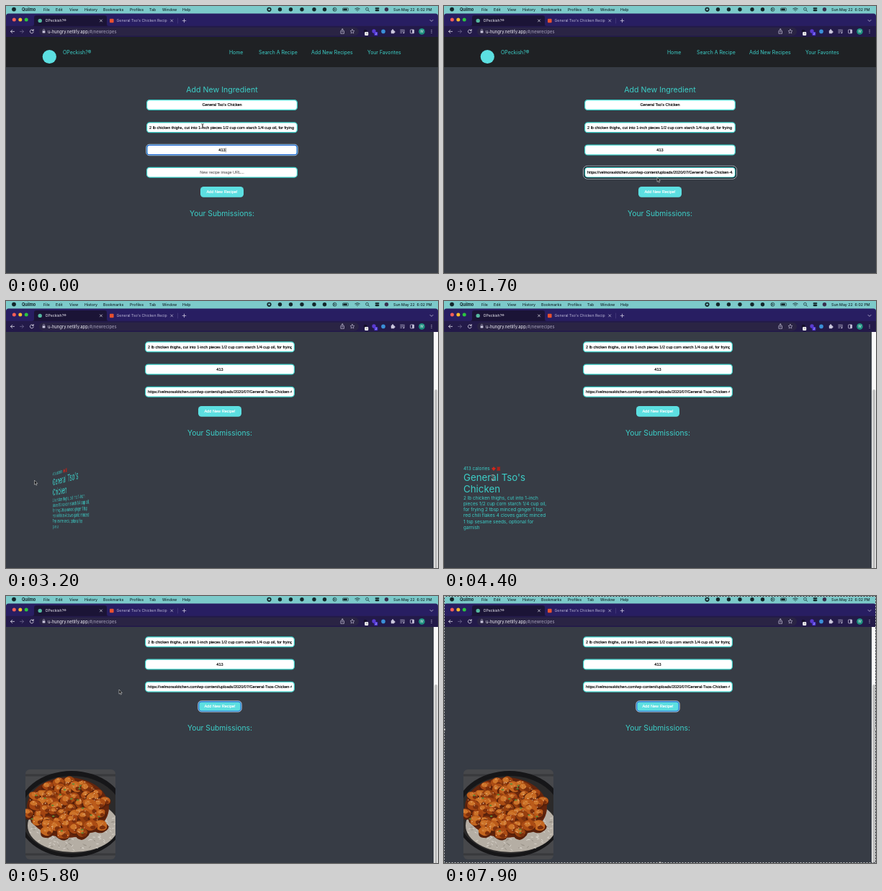
Recreate the animation shown at these times as an HTML page. Size 600x371 px, loop 8000 ms.

```html
<!DOCTYPE html>
<html lang="en">
<head>
<meta charset="utf-8">
<title>Recipe form</title>
<style>
  html, body { margin: 0; width: 100%; height: 100%; overflow: hidden; background: #373c45; }
  #stage { position: relative; width: 600px; height: 371px; overflow: hidden; }
  #stage > svg { position: absolute; left: 0; top: 0; }
  #view { position: absolute; left: 0; top: 43px; width: 600px; height: 328px; overflow: hidden; background: #373c45; }
  #view > svg { position: absolute; left: 0; top: 0; }
  #card { position: absolute; left: 26.5px; width: 125px; height: 125px; }
  #card svg { position: absolute; left: 0; top: 0; overflow: visible; }
  #front { border-radius: 6px; overflow: hidden !important; }
  text { white-space: pre; }
  .ui { font-family: Inter, sans-serif; }
  .form { font-family: "Liberation Sans", Arial, sans-serif; stroke: currentColor; stroke-width: .16px; }
</style>
</head>
<body>
<div id="stage">
  <div id="view">
    <svg id="page" width="600" height="328" viewBox="0 43 600 328"></svg>
    <div id="card">
      <svg id="front" width="125" height="125"></svg>
      <svg id="back" width="125" height="125"></svg>
    </div>
    <svg id="bar" width="600" height="328" viewBox="0 43 600 328">
      <rect x="594" y="43" width="6" height="328" fill="#fafafa"/>
      <rect id="thumb" x="595" y="43" width="4.2" height="249" rx="2.1" fill="#c1c1c1"/>
    </svg>
  </div>
  <svg id="top" width="600" height="371"></svg>
</div>
<script>
const LOOP = 8000, TEAL = '#3ccfc8', CYAN = '#5cdfe1';
const T = { focus: 550, paste: 1450, submit: 2050, scroll: 2800, flip: 2900, unflip: 4700, ring: 5500, select: 6150 };
const FLIP_MS = 800, SCROLL = 105, LENS = 417;
const $ = id => document.getElementById(id);

const label = (x, y, size, fill, str, extra = '', kind = 'ui') =>
  `<text class="${kind}" x="${x}" y="${y}" font-size="${size}" fill="${fill}" color="${fill}" ${extra}>${str}</text>`;
const rect = (x, y, w, h, r, fill, extra = '') =>
  `<rect x="${x}" y="${y}" width="${w}" height="${h}" rx="${r}" fill="${fill}" ${extra}/>`;
const dot = (x, y, r, fill, extra = '') => `<circle cx="${x}" cy="${y}" r="${r}" fill="${fill}" ${extra}/>`;
const line = (d, color, w = .8, extra = '') =>
  `<path d="${d}" fill="none" stroke="${color}" stroke-width="${w}" stroke-linecap="round" stroke-linejoin="round" ${extra}/>`;
const MID = 'text-anchor="middle"';

// ---------- page ----------
const DISH = 'General Tso\'s Chicken';
const PARTS = '2 lb chicken thighs, cut into 1-inch pieces 1/2 cup corn starch 1/4 cup oil, for frying 2 tbsp minced ginger';
const PHOTO = 'https://velmoraskitchen.com/wp-content/uploads/2020/07/General-Tsos-Chicken-4.jpg';
const HISTORY = ['"http://www.pngmart.com/files/3/Toy-Story-Woody-PNG-Photos.png"', 'asdf', 'mo',
  './images/aloe.jpg', './assets/ramen/nirvana.jpg', '23'];

// Two-tone focus outline; grow moves it outwards.
const outline = (x, y, w, h, r, grow, color, width) =>
  rect(x - grow, y - grow, w + 2 * grow, h + 2 * grow, r + grow, 'none', `stroke="${color}" stroke-width="${width}"`);
const ring = (x, y, w, h, r, color, grow = 0) =>
  outline(x, y, w, h, r, grow + .2, '#dfe9f2', .8) + outline(x, y, w, h, r, grow - .8, color, 1.2);

function field(cx, w, y, str, { left, color = '#000', focus, grow } = {}) {
  const x = cx - w / 2, inner = w - 8;
  return rect(x + .6, y + .6, w - 1.2, 13.8, 4, '#fff', `stroke="${TEAL}" stroke-width="1.2"`) +
    (focus ? ring(x, y, w, 15, 4, focus, grow) : '') +
    `<svg x="${x + 4}" y="${y}" width="${inner}" height="15">` +
    label(left ? 0 : inner / 2, 9.4, 5.56, color, str, left ? '' : MID, 'form') + '</svg>';
}

function page({ narrow, urlFocus, pasted, keyRing }) {
  const dx = narrow ? -3 : 0, cx = 300 + dx, w = narrow ? 208 : 210;
  const nav = [[310, 'Home'], [351, 'Search A Recipe'], [424, 'Add New Recipes'], [502, 'Your Favorites']];
  let s = rect(0, 43, 600, 42, 0, '#1f2124') + dot(60.3 + dx, 70.5, 9.6, CYAN) +
    label(79 + dx, 67, 7, TEAL, 'OPeckish?®') +
    nav.map(([x, str]) => label(x + dx, 67, 6.9, TEAL, str)).join('') +
    label(cx, 120, 10.6, TEAL, 'Add New Ingredient', MID) +
    field(cx, w, 130, DISH) +
    field(cx, w, 161.3, PARTS, { left: true }) +
    field(cx, w, 192.5, '413', { focus: !urlFocus && '#1c63cf' }) +
    field(cx, w, 223.7, pasted ? PHOTO : 'New recipe image URL...',
      { left: pasted, color: pasted ? '#000' : '#757575', focus: urlFocus && !narrow && '#10151f', grow: 1.2 });
  if (!urlFocus) s += line('M305.3 197.5v5.4', '#111', .5);
  s += rect(cx - 30, 251, 60, 14.8, 4.5, CYAN) +
    (keyRing ? ring(cx - 30, 251, 60, 14.8, 4.5, '#2a6fd6') : '') +
    label(cx, 260.3, 5.6, '#fff', 'Add New Recipe!', MID, 'form') +
    label(cx, 292.3, 10.3, TEAL, 'Your Submissions:', MID);
  if (urlFocus && !pasted) {
    s += line('M300 228.5v5.4', '#111', .5) + '<path d="M239 243.5l4.5-4.5 4.5 4.5z" fill="#fff"/>' +
      rect(235, 243, 189.5, 93, 2.5, '#fff') +
      HISTORY.map((h, i) => label(239.8, 254 + 15 * i, 5.7, '#111', h, '', 'form')).join('');
  }
  return s;
}

// ---------- card ----------
function dishPhoto() {
  let seed = 11;
  const rnd = (a = 0, b = 1) => {
    seed = (seed * 16807) % 2147483647;
    return a + (b - a) * seed / 2147483647;
  };
  const inside = (cx, cy, rx, ry) => {
    const a = rnd(0, 2 * Math.PI), r = Math.sqrt(rnd());
    return [cx + Math.cos(a) * rx * r, cy + Math.sin(a) * ry * r];
  };
  const oval = (x, y, rx, ry, fill, extra = '') =>
    `<ellipse cx="${x.toFixed(1)}" cy="${y.toFixed(1)}" rx="${rx.toFixed(1)}" ry="${ry.toFixed(1)}" fill="${fill}" ${extra}/>`;
  const grain = ([x, y], color, len, w) => {
    const a = rnd(-1, 1);
    return line(`M${x.toFixed(1)} ${y.toFixed(1)}l${(len * Math.cos(a)).toFixed(1)} ${(len * Math.sin(a)).toFixed(1)}`, color, w);
  };
  // Rough closed curve through the midpoints of jittered corners.
  const lump = (x, y, r, fill) => {
    const p = Array.from({ length: 8 }, (_, i) => {
      const a = i * Math.PI / 4, q = r * rnd(.8, 1.25);
      return [x + q * Math.cos(a), y + q * .8 * Math.sin(a)];
    });
    const mid = i => p[i % 8].map((v, j) => ((v + p[(i + 1) % 8][j]) / 2).toFixed(1)).join(' ');
    return `<path d="M${mid(7)}${p.map((c, i) => `Q${c.map(v => v.toFixed(1)).join(' ')} ${mid(i)}`).join('')}" fill="${fill}"/>`;
  };

  let s = rect(0, 0, 125, 125, 0, '#47484b') + line('M0 8h125M0 118h125', '#38393c', 3) +
    oval(64, 62, 76, 60, '#161618') + oval(64, 63, 71, 54, '#2b2a2a') + oval(66, 78, 63, 37, '#b5aea4');
  for (let i = 0; i < 170; i++) s += grain(inside(66, 82, 61, 32), i % 3 ? '#e2ded6' : '#8d867c', 2.4, .8);
  s += oval(59, 53, 57, 42, '#65250c');
  const count = 52, lumps = Array.from({ length: count }, (_, i) => {
    const a = i * 2.4, q = Math.sqrt((i + .5) / count);
    return [59 + 55 * q * Math.cos(a) + rnd(-3, 3), 53 + 40 * q * Math.sin(a) + rnd(-3, 3)];
  }).sort((a, b) => a[1] - b[1]);
  const tones = ['#97400f', '#ab4c14', '#bb5b1a', '#a34412', '#c4661f'];
  lumps.forEach(([x, y], i) => {
    const r = rnd(7.5, 10.5);
    s += lump(x, y + 2, r, '#57200b') + lump(x, y, r * .95, tones[i % 5]) +
      lump(x + r * .3, y + r * .3, r * .4, '#7c300d') + lump(x - r * .2, y - r * .2, r * .45, '#cd7429');
    for (let j = 0; j < 3; j++) s += grain(inside(x - 1, y - 2, r * .6, r * .35), '#e9ae78', 1.6, .6);
  });
  for (let i = 0; i < 80; i++) s += oval(...inside(59, 53, 55, 40), .7, .5, '#f0d4a8');
  for (let i = 0; i < 18; i++) s += oval(...inside(59, 58, 56, 40), 1.8, 1, '#5f8a35');
  return s;
}

const NOTES = ['2 lb chicken thighs, cut into 1-inch', 'pieces 1/2 cup corn starch 1/4 cup oil,',
  'for frying 2 tbsp minced ginger 1 tsp', 'red chili flakes 4 cloves garlic minced',
  '1 tsp sesame seeds, optional for', 'garnish'];
$('front').innerHTML = dishPhoto();
$('back').innerHTML = label(0, -5.8, 6.5, TEAL, '413 calories') +
  '<path d="M39 -8.5l2-1 1-1.6 1 1.6 2 1-2 2.6-1 .9-1-.9z" fill="#d3271c"/>' +
  '<path d="M46.3 -10.6h5l-.6 2.1 .6 3.2h-5l.6-3.2z" fill="#a8241d"/>' +
  label(0, 9, 13.3, TEAL, 'General Tso\'s') + label(0, 25.2, 13.3, TEAL, 'Chicken') +
  NOTES.map((n, i) => label(0, 34.7 + 8.2 * i, 6.45, TEAL, n)).join('');

// ---------- browser frame ----------
function browser() {
  const ink = '#14272b', pale = '#c9c5dc', toolbar = '#231a49';
  const menus = [[52, 'File'], [69, 'Edit'], [88, 'View'], [109, 'History'], [135, 'Bookmarks'],
    [172, 'Profiles'], [199, 'Tab'], [217, 'Window'], [245, 'Help']];
  let s = rect(0, 0, 600, 16, 0, '#7ccaca') + dot(11, 4.6, 2.9, ink) +
    label(22, 6.5, 5.5, ink, 'Quilmo', 'font-weight="700"') +
    menus.map(([x, m]) => label(x, 6.5, 5.25, ink, m, 'font-weight="500"')).join('') +
    dot(365.5, 4.8, 3.1, ink) + rect(364.3, 3.6, 2.4, 2.4, .4, '#7ccaca') +
    [380.5, 395.5, 411, 428, 442.5].map(x => dot(x, 4.8, 2.7, ink)).join('') +
    dot(456.5, 4.8, 2.5, 'none', `stroke="${ink}" stroke-width=".7"`) + line('M455.6 3.6l2 1.2-2 1.2z', ink, .6) +
    rect(467.5, 2.8, 8, 4, 1, 'none', `stroke="${ink}" stroke-width=".6"`) + rect(468.3, 3.5, 5.5, 2.6, .4, ink) +
    line('M484.7 3.8q3.3-2.6 6.6 0M486 5.3q2-1.5 4 0M487.8 6.8h.4', ink, .8) +
    dot(501.5, 4.3, 1.9, 'none', `stroke="${ink}" stroke-width=".7"`) + line('M503 5.8l1.6 1.6', ink) +
    rect(512.6, 2.2, 5.8, 2.2, 1.1, ink) + rect(512.6, 5, 5.8, 2.2, 1.1, ink) + dot(528.5, 4.8, 2.7, '#3a3150') +
    label(538, 6.5, 5.25, ink, 'Sun May 22  6:02 PM', 'font-weight="500"');
  s += rect(0, 10.6, 600, 24, 3.5, '#281e62') +
    `<path d="M36 28q3 0 3-3v-9q0-3 3-3h95q3 0 3 3v9q0 3 3 3z" fill="#1b1436"/>` +
    dot(11.3, 19, 2.5, '#fb5f57') + dot(19.8, 19, 2.5, '#f8bc2f') + dot(28.2, 19, 2.5, '#2bc640') +
    dot(47.2, 20.4, 2.7, '#55b8a0') + label(54.5, 22.4, 5.2, '#f1eff8', 'OPeckish?®') +
    line('M130.5 18.9l3 3m0-3l-3 3', '#e8e6f0', .7) +
    rect(144, 17.7, 5.6, 5.6, 1, '#e8502f') + label(153.5, 22.4, 5.2, '#bdb8d8', 'General Tso\'s Chicken Recip') +
    line('M228.7 18.9l3 3m0-3l-3 3', pale, .7) + line('M238.6 17v7', '#5a5190', .5) +
    line('M245.2 20.4h4.6m-2.3-2.3v4.6', pale, .8) + line('M589 19.4l2 2 2-2', pale, .8);
  s += rect(0, 27.8, 600, 15.2, 0, toolbar) + rect(46, 29.8, 444, 11.4, 5.7, '#2a2444') +
    line('M11.5 35.4h-5m2.2-2.2l-2.2 2.2 2.2 2.2', '#e3e0ee') +
    line('M19.5 35.4h5m-2.2-2.2l2.2 2.2-2.2 2.2', '#6e6690') +
    line('M37.8 33.8a2.5 2.5 0 1 0 .5 2.2M38.2 32.5v1.8h-1.8', '#e3e0ee') +
    rect(50.6, 34.6, 3.8, 3, .5, pale) + line('M51.4 34.5v-1a1.1 1.1 0 0 1 2.2 0v1', pale, .6) +
    label(58, 37.5, 5.85, '#f2f0f8', 'u-hungry.netlify.app<tspan fill="#a9a4bd">/#/newrecipes</tspan>') +
    line('M465.8 34.6h-.9v3.7h4.6v-3.7h-.9M467.2 36.4v-4.6m-1.4 1.3l1.4-1.3 1.4 1.3', pale, .7) +
    line('M481 32.3l.9 2 2.1.2-1.6 1.4.5 2.1-1.9-1.1-1.9 1.1.5-2.1-1.6-1.4 2.1-.2z', pale, .6) +
    dot(499, 35, 2.3, '#15102a') + rect(498.2, 36, 5, 5, 1, '#f2f2f4') + label(500.7, 40.1, 3.8, '#222', '1', MID) +
    dot(511, 35, 2.7, '#5a3bd0') + rect(511.3, 36, 5, 5, 1, '#4d35d8') + label(513.8, 40.1, 3.8, '#fff', '2', MID) +
    dot(524, 35.4, 2.8, '#3a8fd8') +
    rect(534.8, 33.8, 4.6, 4.4, .6, pale) + dot(537.1, 33.4, 1.1, pale) + dot(539.5, 36, 1.1, pale) +
    line('M547.8 33.2h4m-4 2h4m-4 2h2M553 33v4', pale, .7) + dot(552.3, 37.3, .9, pale) +
    rect(561.6, 32.9, 5, 5, .6, 'none', `stroke="${pale}" stroke-width=".8"`) + rect(564.2, 33, 2.4, 4.8, 0, pale) +
    dot(577.5, 35.4, 4.3, '#1d8f7e') + label(577.5, 37.1, 4.6, '#fff', 'W', MID) +
    [33.3, 35.4, 37.5].map(y => dot(591, y, .6, pale)).join('');
  return s;
}

const BEAM = 'M-1.3-3.2q1.3 0 1.3 1v4.4q0 1-1.3 1M1.3-3.2q-1.3 0-1.3 1v4.4q0 1 1.3 1';
const CURSORS = {
  arrow: '<path d="M0 0v6.2l1.4-1.3 1 2.2 1-.5-1-2.1h1.9z" fill="#111" stroke="#eee" stroke-width=".5"/>',
  beam: line(BEAM, '#eee', 1.3) + line(BEAM, '#222', .7),
  hand: '<path d="M-.7 0q.7-.8 1.4 0v2.8l3 .8v2.4l-.8 1.8h-3.2l-2.2-3 .7-.7 1.1.9z" fill="#fff" stroke="#111" stroke-width=".5"/>',
};
$('top').innerHTML = browser() +
  '<g id="select" fill="none"><rect x=".5" y=".5" width="599" height="370" stroke="#2e3238"/>' +
  '<rect x=".5" y=".5" width="599" height="370" stroke="#c4c6c8" stroke-dasharray="2 2"/>' +
  [[0, 185.5], [600, 185.5], [300, 0], [300, 371]].map(([x, y]) => dot(x, y, 1.8, '#d8d8d8', 'stroke="#555" stroke-width=".4"')).join('') +
  '</g><g id="cursor"></g>';

// ---------- motion ----------
const clamp = v => Math.max(0, Math.min(1, v));
const smooth = v => v * v * (3 - 2 * v);

// CSS "ease": cubic-bezier(.25, .1, .25, 1)
function ease(x) {
  if (x <= 0 || x >= 1) return clamp(x);
  let lo = 0, hi = 1;
  for (let i = 0; i < 24; i++) {
    const u = (lo + hi) / 2;
    if (.75 * u * (1 - u) + u ** 3 < x) lo = u; else hi = u;
  }
  return .3 * lo * (1 - lo) ** 2 + 3 * lo * lo * (1 - lo) + lo ** 3;
}

const ROUTE = [[0, 273, 167], [100, 273, 167], [480, 295, 231], [1600, 295, 231], [1900, 299, 258], [2120, 299, 258],
  [2600, 32, 254], [2800, 32, 254], [3200, 39.5, 249], [3500, 44, 250], [4200, 67.5, 245],
  [4550, 68, 245], [5300, 157, 130], [LOOP, 157, 130]];
function pointer(t) {
  const i = Math.max(1, ROUTE.findIndex(p => p[0] > t)), [t0, x0, y0] = ROUTE[i - 1], [t1, x1, y1] = ROUTE[i];
  const k = smooth((t - t0) / (t1 - t0));
  return [x0 + (x1 - x0) * k, y0 + (y1 - y0) * k];
}
function pointerKind(t, x, y) {
  if (t < 1700 || (t > 3900 && t < T.unflip)) return 'beam';
  return t < 2300 && Math.abs(x - 299) < 30 && y > 251 ? 'hand' : 'arrow';
}

let pageKey = '', cursorKey = '';
function draw(t) {
  const state = { narrow: t >= T.submit, urlFocus: t >= T.focus, pasted: t >= T.paste, keyRing: t >= T.ring };
  const key = Object.values(state).join();
  if (key !== pageKey) $('page').innerHTML = page(state);
  pageKey = key;

  const k = smooth(clamp((t - T.scroll) / 220));
  $('page').setAttribute('viewBox', `0 ${43 + SCROLL * k} 600 328`);
  $('thumb').setAttribute('y', 43 + 80 * k);
  $('bar').style.display = $('card').style.display = state.narrow ? '' : 'none';

  const turn = 180 * (ease((t - T.flip) / FLIP_MS) - ease((t - T.unflip) / FLIP_MS));
  const showBack = turn > 90;
  $('card').style.top = 303 - SCROLL * k + 'px';
  $('card').style.transform = `perspective(${LENS}px) rotateY(${showBack ? turn - 180 : turn}deg)`;
  $('front').style.display = showBack ? 'none' : '';
  $('back').style.display = showBack ? '' : 'none';

  const [x, y] = pointer(t), kind = pointerKind(t, x, y);
  if (kind !== cursorKey) $('cursor').innerHTML = CURSORS[kind];
  cursorKey = kind;
  $('cursor').setAttribute('transform', `translate(${x} ${y})`);
  $('cursor').style.display = t < T.select ? '' : 'none';
  $('select').style.display = t < T.select ? 'none' : '';
}

const start = performance.now();
function tick() {
  draw((performance.now() - start) % LOOP);
  requestAnimationFrame(tick);
}
tick();
</script>
</body>
</html>
```
